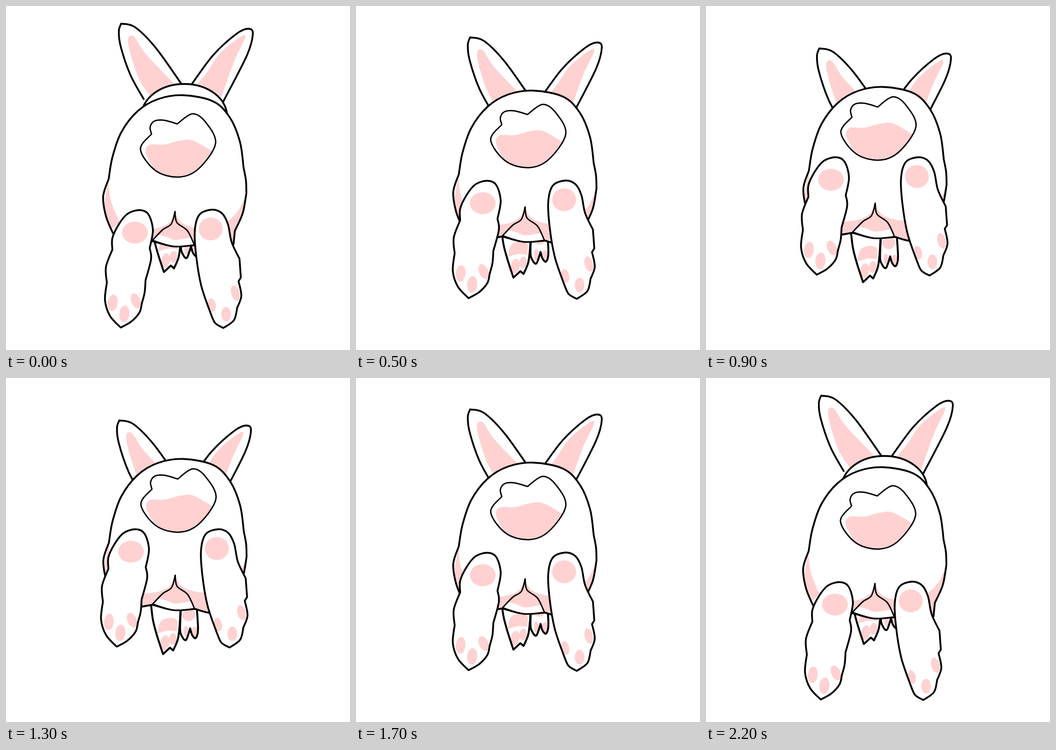
Recreate the animation shown at these times as an HTML page with a canvas. Size 747 by 750 pixels, loop 2.3 s.

```html
<!DOCTYPE html>
<html lang="en">
<head>
<meta charset="utf-8">
<title>Hopping bunny</title>
<style>
html, body { margin: 0; width: 100%; height: 100%; overflow: hidden; background: #fff; }
canvas { display: block; }
</style>
</head>
<body>
<canvas id="stage" width="747" height="750"></canvas>
<script>
const ctx = document.getElementById('stage').getContext('2d');
const PINK = '#ffd1d1', STEP = 100, STEPS = 23, TURN = 11;

// Smooth curve through a few key points; separate runs meet in sharp corners.
function curve(...runs) {
  const path = new Path2D();
  let last = null;
  for (const run of runs) {
    const p = last ? [last] : [];
    for (let i = 0; i < run.length; i += 2) p.push([run[i], run[i + 1]]);
    if (!last) path.moveTo(...p[0]);
    for (let i = 0; i < p.length - 1; i++) {
      const a = p[i - 1] || p[i], b = p[i], c = p[i + 1], d = p[i + 2] || c;
      path.bezierCurveTo(b[0] + (c[0] - a[0]) / 6, b[1] + (c[1] - a[1]) / 6,
        c[0] - (d[0] - b[0]) / 6, c[1] - (d[1] - b[1]) / 6, c[0], c[1]);
    }
    last = p[p.length - 1];
  }
  return path;
}

function oval(x, y, rx, ry, tilt = 0) {
  const path = new Path2D();
  path.ellipse(x, y, rx, ry, tilt, 0, 2 * Math.PI);
  return path;
}

const part = (line, pinks = [], width = 3.9) => ({ line, pinks, width });

const leftEar = part(
  curve([299, 203, 270, 150, 249, 88, 245, 55, 250, 38.5], [280, 46, 325, 91, 381, 170]),
  [curve([313, 196, 287, 155, 265, 80, 277, 66, 304, 105, 364, 168], [345, 200])]);

const rightEar = part(
  curve([403, 171, 450, 107, 500, 61, 526, 49.5, 536, 61, 523, 108, 472, 208]),
  [curve([416, 169, 437, 144, 465, 103, 508, 68, 519, 70, 495, 122, 468, 198], [440, 200])]);

const head = part(oval(387, 240, 93, 70));

const leftPaw = part(
  curve([314, 485, 319, 527, 328, 562, 341, 602], [356, 588], [363, 594], [373, 570, 377, 540, 380, 485]),
  [
    curve([329, 557, 335, 532, 353, 523, 371, 528, 371, 552], [350, 551, 329, 557]),
    oval(345, 577, 9.5, 16, 0.15), oval(362, 569, 8, 13, 0.1)
  ], 4.2);

const rightPaw = part(
  curve([381, 485, 378, 545, 382, 563, 391, 571, 400, 546], [404, 560, 412, 567, 417, 547, 413, 485]),
  [oval(397, 517, 14, 13, -0.2), oval(390.5, 552, 5, 12), oval(409, 554, 7, 12, 0.15)], 4.2);

const body = part(
  curve(
    [223, 377, 231, 330, 250, 276, 285, 230, 330, 203, 385, 194.5, 450, 208, 486, 243, 508, 296, 516, 353],
    [521, 380, 522, 408], [514, 452, 497, 490], [494, 520], [450, 531, 410, 521.5],
    [364, 524, 318, 512.5], [265, 518, 232, 495], [217, 458, 211, 415, 223, 377]),
  [
    curve([222, 379, 228, 425, 247, 472], [200, 510]),
    curve([522, 408, 505, 445, 478, 473], [478, 540], [540, 540]),
    curve([270, 490, 325, 485, 353, 473, 367, 450], [381, 472, 412, 484, 460, 488], [460, 540], [270, 540])
  ]);

const belly = part(
  curve([318, 511, 340, 488, 359, 475, 367, 448], [371, 472, 394, 490, 409, 521], [364, 524, 318, 511]),
  [curve([328, 498, 348, 503, 368, 510, 405, 504], [410, 440], [328, 440])], 3);

const tail = part(
  curve(
    [372, 257, 405, 235, 434, 254, 455, 300, 418, 355, 375, 373, 325, 359, 292, 313, 316, 279],
    [313, 264, 322, 251, 343, 249, 372, 257]),
  [curve([325, 361, 304, 322, 311, 303, 345, 302, 375, 294, 405, 293, 448, 317], [460, 390], [330, 390])],
  3);

const leftLeg = part(
  curve(
    [231, 531, 231, 506, 245, 476, 264, 453, 290, 445, 309, 454, 319, 488, 312, 528],
    [315, 552, 303, 598], [301, 625, 295, 648], [290, 668, 272, 688, 249, 701],
    [226, 676, 215, 642, 219, 603], [217, 569, 231, 531]),
  [oval(280, 494, 28, 24), oval(232, 647, 10.5, 18, 0.1), oval(257, 671, 11, 18, 0.1), oval(282, 643, 10, 17, -0.4)]);

const rightLeg = part(
  curve(
    [444, 669, 424, 610, 413, 545, 410, 490, 420, 455, 447, 444, 469, 452, 482, 476, 490, 515, 507, 551],
    [510, 592], [505, 600], [511, 632, 502, 658], [495, 685, 472, 702], [454, 691, 444, 669]),
  [oval(444.5, 486, 26, 25), oval(447, 652, 8.5, 15, -0.2), oval(478, 672, 10.5, 16), oval(498, 626, 9, 17, -0.25)]);

function draw({ line, pinks, width }) {
  ctx.fillStyle = '#fff';
  ctx.fill(line);
  ctx.save();
  ctx.clip(line);
  ctx.fillStyle = PINK;
  pinks.forEach(p => ctx.fill(p));
  ctx.restore();
  ctx.lineWidth = width;
  ctx.stroke(line);
}

function group(dx, dy, ...parts) {
  ctx.save();
  ctx.translate(dx, dy);
  parts.forEach(draw);
  ctx.restore();
}

// Every group slides along its own straight line, n steps from rest.
function render(n) {
  ctx.fillStyle = '#fff';
  ctx.fillRect(0, 0, 747, 750);
  ctx.strokeStyle = '#000';
  ctx.lineJoin = ctx.lineCap = 'round';
  group(-0.45 * n, 6 * n, leftEar, rightEar, head);
  group(-0.2 * (n - 9), 2.45 * (n - 9), leftPaw, rightPaw);
  group(0.05 * n, -2 * n, body, belly);
  group(0.1 * n, -4.1 * n, tail);
  group(-0.95 * n, -12.8 * n, leftLeg);
  group(1.5 * n, -12.7 * n, rightLeg);
}

const start = performance.now();
function tick() {
  const k = Math.floor((performance.now() - start) / STEP) % STEPS;
  render(TURN - Math.abs(k - TURN));
  requestAnimationFrame(tick);
}
tick();
</script>
</body>
</html>
```
